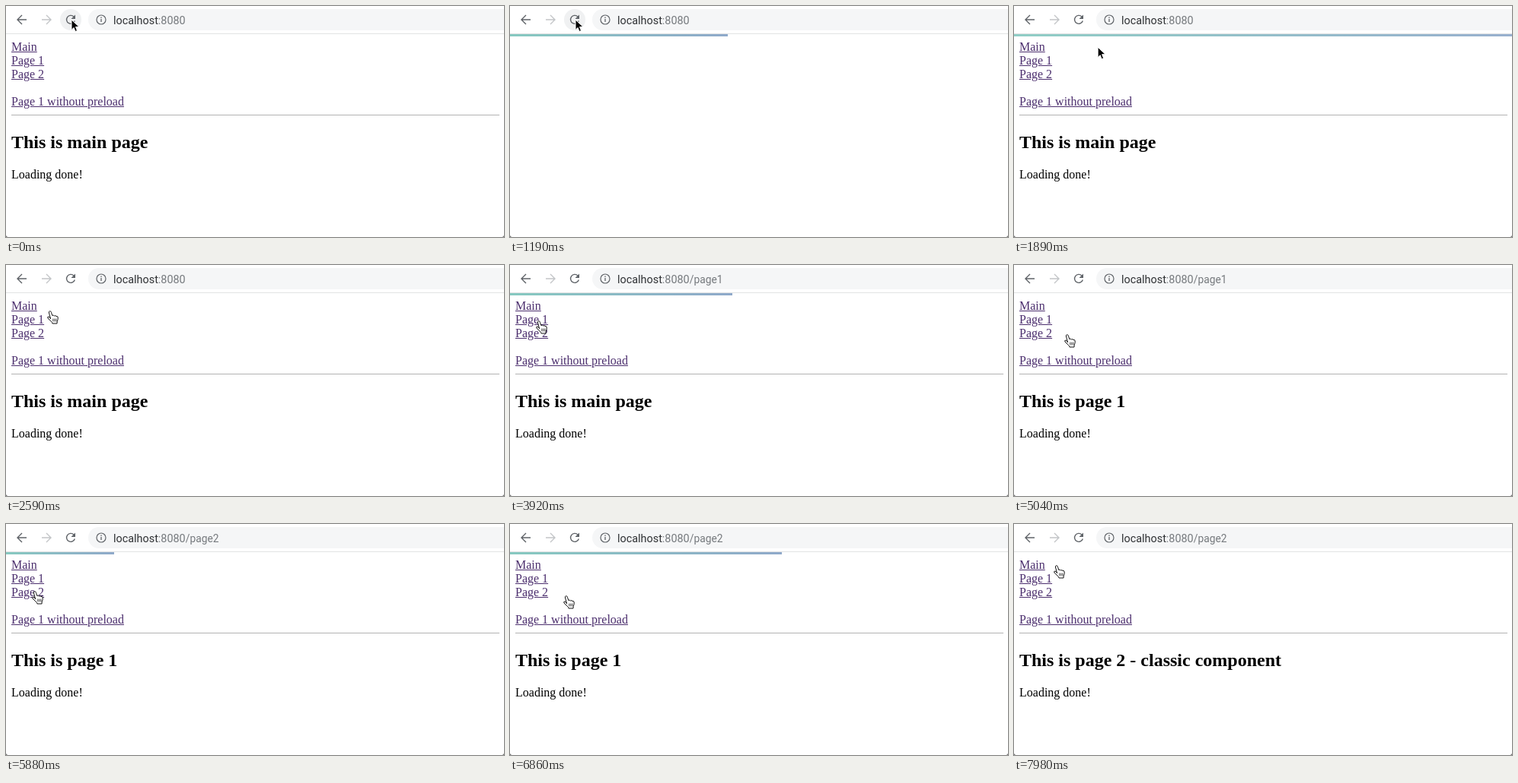
An HTML page that plays this animation: 654 px wide and 304 px high, repeating every 8000 ms.

```html
<!DOCTYPE html>
<html lang="en">
<head>
<meta charset="utf-8">
<title>Preload demo</title>
<style>
  html, body { margin: 0; width: 100%; height: 100%; overflow: hidden; background: #fff; }
  svg, #page, #page > *, #bar, #url { position: absolute; }
  svg { left: 0; top: 0; }
  #url { left: 141px; top: 8.5px; font: 14.4px/20px Roboto, sans-serif; color: #75797d; white-space: pre; }
  #url b { font-weight: 400; color: #303235; }
  #path { font-size: 13.8px; }
  #page { left: 7px; top: 0; width: 641px; font: 16px/18px "Liberation Serif", serif; color: #000; white-space: nowrap; }
  #page > * { left: 0; margin: 0; }
  nav { top: 45px; }
  a { color: #4c2f6e; text-decoration: underline; }
  hr { top: 143px; width: 641px; height: 1px; border: 0; background: #b2b2b2; }
  h2 { top: 166px; font: bold 24px/27px "Liberation Serif", serif; }
  p { top: 213px; }
  #bar { left: 0; top: 37px; height: 3px; background: linear-gradient(90deg, #86c9c0, #8fa9ca); }
</style>
</head>
<body>
<svg width="654" height="304" fill="none">
  <path d="M0 36.5H654" stroke="#e2e3e4"/>
  <path d="M660 4H122a14 14 0 0 0 0 28H660z" fill="#f5f6f7"/>
  <circle id="hover" cx="85" cy="18" r="14" fill="#f0f1f2"/>
  <g stroke="#5f6368" stroke-width="1.4">
    <path id="back" d="M27 18H15M21 12l-6 6 6 6"/>
    <path d="M47 18H59M53 12l6 6-6 6" stroke="#c3c5c8"/>
    <path d="M89 14A5.5 5.5 0 1 0 90.300 19.500"/>
    <circle cx="125" cy="18" r="6" stroke-width="1.200"/>
    <path d="M125 17v4M125 14.500v1.500" stroke-width="1.300"/>
  </g>
  <path d="M91 11.500v5.500h-5.500z" fill="#5f6368"/>
  <path d="M0 302v2h2zM654 302v2h-2z" fill="#777"/>
</svg>
<div id="url"><b>localhost</b>:8080<span id="path"></span></div>
<div id="page">
  <nav><a>Main</a><br><a>Page 1</a><br><a>Page 2</a><br><br><a>Page 1 without preload</a></nav>
  <hr>
  <h2 id="title"></h2>
  <p>Loading done!</p>
</div>
<div id="bar"></div>
<svg width="654" height="304">
  <path id="arrow" d="M0 0V13.500L3 10.500 5 15.500 7.500 14.500 5.500 9.500H10Z" fill="#000" stroke="#fff"/>
  <g id="hand" fill="#fff" stroke="#111" stroke-linejoin="round" stroke-linecap="round">
    <path d="M4.500 10.500L2.500 3Q2 1 3.500 .7Q5 .5 5.500 2.500L6.800 6.500Q8.500 5.500 9.500 7Q11.200 6 12 7.500Q14 7 14.200 9Q14.500 12 13.200 14L13 17H7L6.500 15.500Q4.500 13.500 1 10Q0 8 2 8Q3.500 8.500 4.500 10.500Z"/>
    <path d="M7.800 11v3M9.800 11v3M11.800 11v3" stroke-width=".8"/>
  </g>
</svg>
<script>
const $ = id => document.getElementById(id);
const LOOP = 8000, WIDTH = 654, DELAY = 360, WAIT = 1440, FINISH = 220, FADE = 180, GLIDE = 420;

const loads = [
  { start: 217, path: '', title: 'This is main page' },
  { start: 2916, path: '/page1', title: 'This is page 1' },
  { start: 5473, path: '/page2', title: 'This is page 2 - classic component' }
];

// Cursor stops: arrival time, x, y
const stops = [
  [0, 86, 18], [1960, 112, 57], [2590, 54, 60], [2800, 34, 73], [4900, 32, 79],
  [5040, 66, 91], [5600, 34, 88], [6500, 70, 94], [7980, 52, 54]
];

const clamp = v => Math.min(1, Math.max(0, v));
const cubicOut = v => 1 - (1 - clamp(v)) ** 3;
const smooth = v => v * v * (3 - 2 * v);
const show = (el, on) => el.style.visibility = on ? 'visible' : 'hidden';

// Rest at each stop, then glide so as to arrive at the next one on time.
function cursorAt(t) {
  const i = stops.findIndex(s => s[0] > t);
  if (i < 0) return stops.at(-1).slice(1);
  const [t0, x0, y0] = stops[i - 1], [t1, x1, y1] = stops[i];
  const e = smooth(clamp(1 - (t1 - t) / Math.min(GLIDE, t1 - t0)));
  return [x0 + (x1 - x0) * e, y0 + (y1 - y0) * e];
}

// The bar trickles toward 70% while waiting, then runs to the end and fades.
function drawBar(age) {
  const held = 0.7 * cubicOut(Math.min(age, WAIT) / 3500);
  const progress = held + (1 - held) * cubicOut((age - WAIT) / FINISH);
  $('bar').style.width = WIDTH * progress + 'px';
  $('bar').style.opacity = age < DELAY ? 0 : 1 - clamp((age - WAIT - FINISH) / FADE);
}

function draw(t) {
  const latest = delay => loads.findLast(l => t >= l.start + delay) || loads[0];
  const current = latest(DELAY), age = t - current.start;
  drawBar(age);
  $('path').textContent = current.path;
  $('title').textContent = latest(WAIT).title;
  show($('page'), current !== loads[0] || age < DELAY || age >= WAIT);

  const [x, y] = cursorAt(t), isHand = t > 2480;
  for (const id of ['arrow', 'hand']) $(id).setAttribute('transform', `translate(${x} ${y})`);
  show($('arrow'), !isHand);
  show($('hand'), isHand);
  show($('hover'), Math.hypot(x - 85, y - 18) < 14);
}

const tick = () => {
  draw(performance.now() % LOOP);
  requestAnimationFrame(tick);
};
tick();
</script>
</body>
</html>
```
